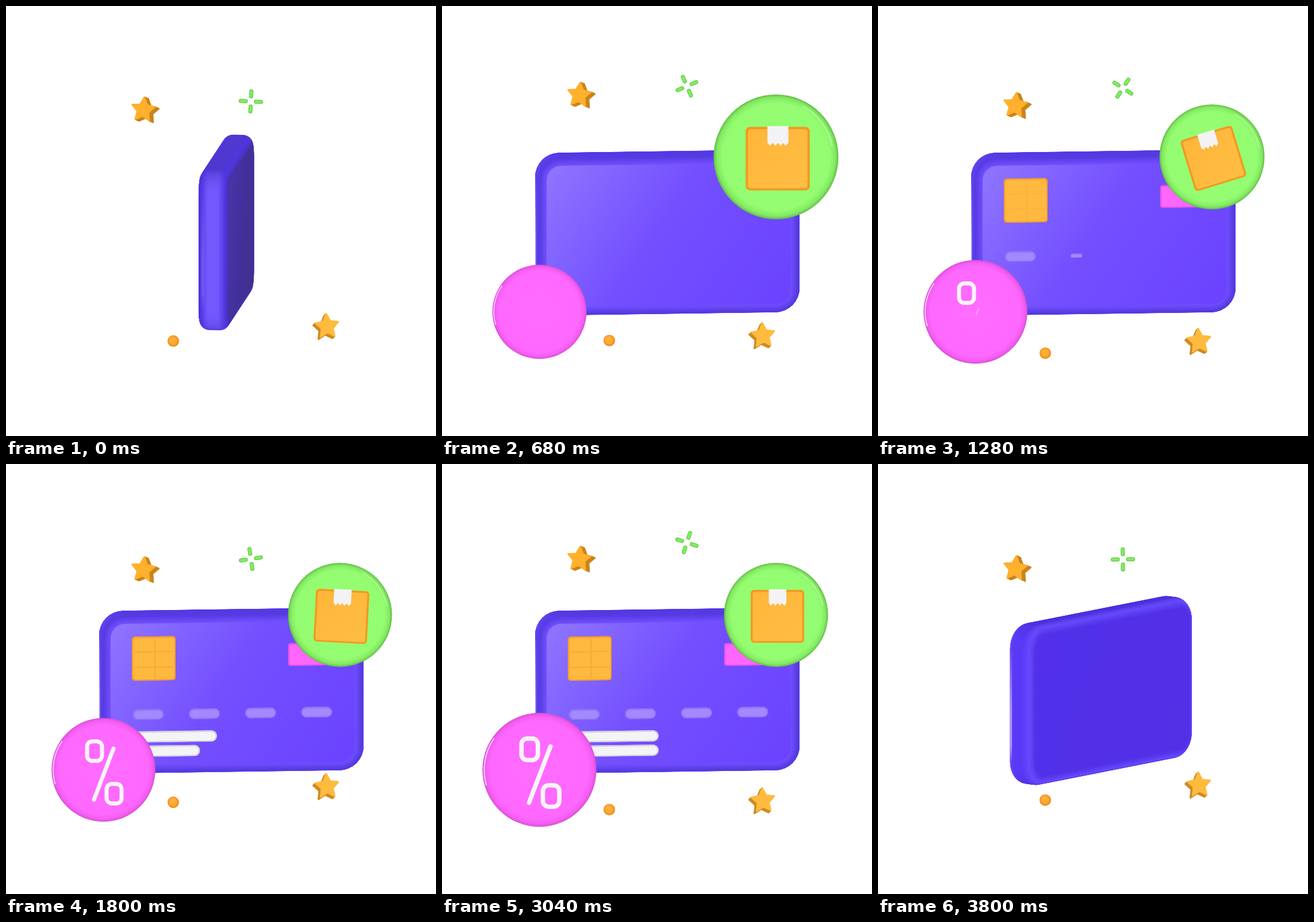
Recreate the animation shown at these times as an HTML page with a canvas. Size 748 by 748 pixels, loop 3.84 s.

```html
<!DOCTYPE html>
<html lang="en">
<head>
<meta charset="utf-8">
<title>Card payment</title>
<style>
  html, body { margin: 0; width: 100%; height: 100%; overflow: hidden; background: #fff; }
  canvas { display: block; width: 748px; height: 748px; }
</style>
</head>
<body>
<canvas id="stage" width="748" height="748"></canvas>
<script>
const ctx = document.getElementById('stage').getContext('2d');
const LOOP = 3840, STEP = 40, TAU = Math.PI * 2;
const CARD = { w: 460, h: 283, depth: 52, bevel: 17, radius: 42, y: 394 };
const TILT_SIN = 0.16, TILT_COS = 0.987;

// Card colours at four yaw angles, blended in between.
const YAWS = [5, 25, 51, 84];
const TONES = {
  light: ['#8d73ff', '#6743ff', '#5230ea', '#4a34a8'],
  face: ['#734fff', '#6440ff', '#5130e8', '#43309c'],
  shade: ['#6b43ff', '#623cff', '#5130e6', '#41308f'],
  edge: ['#563be2', '#6a49fb', '#6749fb', '#4f35e0'],
  wall: ['#5f43f0', '#6446f4', '#5a38f6', '#7459ff'],
  top: ['#5438e4', '#5034dc', '#4c30dc', '#4e38cf']
};

const clamp = v => Math.max(0, Math.min(1, v));
const smooth = u => u * u * (3 - 2 * u);
const progress = (t, start, length) => clamp((t - start) / length);
const rgb = hex => [1, 3, 5].map(i => parseInt(hex.slice(i, i + 2), 16));
const mix = (a, b, u) => a.map((v, i) => v + (b[i] - v) * u);
const css = c => `rgb(${c.map(Math.round).join()})`;

function keyed(t, keys) {
  if (t <= keys[0][0]) return keys[0][1];
  for (let i = 1; i < keys.length; i++) {
    const [t0, v0] = keys[i - 1], [t1, v1] = keys[i];
    if (t < t1) return v0 + (v1 - v0) * smooth((t - t0) / (t1 - t0));
  }
  return keys[keys.length - 1][1];
}

function tone(name, yaw) {
  const i = yaw < YAWS[1] ? 0 : yaw < YAWS[2] ? 1 : 2;
  const u = clamp((yaw - YAWS[i]) / (YAWS[i + 1] - YAWS[i]));
  return mix(rgb(TONES[name][i]), rgb(TONES[name][i + 1]), u);
}

function roundRect(x, y, w, h, r) {
  ctx.beginPath();
  ctx.roundRect(x, y, w, h, Math.min(r, w / 2, h / 2));
}

function at(x, y, scale, angle, draw) {
  ctx.save();
  ctx.translate(x, y);
  ctx.rotate(angle);
  ctx.scale(scale, scale);
  draw();
  ctx.restore();
}

function cardYaw(t) {
  if (t < 600) return 5 + 79 * (1 - t / 600) ** 3;
  return 5 + 46 * Math.max(0, (t - 3140) / 660) ** 1.84;
}

function cardPlane(yaw, z) {
  const a = yaw * Math.PI / 180, s = Math.sin(a), c = Math.cos(a);
  ctx.setTransform(c, -s * TILT_SIN, 0, TILT_COS,
    392 - 9 * s ** 3 + z * s, CARD.y + z * c * TILT_SIN);
}

function cardSlices() {
  const { depth, bevel } = CARD, flat = depth / 2 - bevel, list = [];
  const curve = (i, side) => {
    const phi = i / 24 * Math.PI / 2;
    return { z: side * (flat + bevel * Math.sin(phi)), inset: bevel * (1 - Math.cos(phi)), bend: i / 24, side };
  };
  for (let i = 24; i > 0; i--) list.push(curve(i, -1));
  for (let z = -flat; z <= flat; z++) list.push({ z, inset: 0, bend: 0, side: 0 });
  for (let i = 1; i <= 24; i++) list.push(curve(i, 1));
  return list;
}
const SLICES = cardSlices();

function drawCard(yaw) {
  const { w, h, radius } = CARD;
  const c = {};
  for (const name in TONES) c[name] = tone(name, yaw);
  const shine = keyed(yaw, [[5, 0.75], [25, 0.95], [45, 0]]);

  SLICES.forEach((s, i) => {
    cardPlane(yaw, s.z);
    const toEdge = clamp(s.bend * 2), toFace = s.side > 0 ? clamp(s.bend * 2 - 1) : 0;
    const rim = base => css(mix(mix(base, c.edge, toEdge), c.face, toFace));
    const left = -w / 2 + s.inset, top = -h / 2 + s.inset;
    const paint = ctx.createLinearGradient(-w / 2, 0, w / 2, 0);
    paint.addColorStop(0.01, rim(c.wall));
    paint.addColorStop(0.09, rim(c.top));
    ctx.fillStyle = paint;
    roundRect(left, top, w - 2 * s.inset, h - 2 * s.inset, radius - s.inset);
    ctx.fill();

    const alpha = s.side < 0 && s.bend > 0.2 && s.bend < 0.5 ? Math.max(shine, 0.6) : s.z < 9 && s.bend < 0.5 ? shine : 0;
    if (alpha > 0.01) {
      const glow = ctx.createLinearGradient(0, -h / 2 + radius, 0, h / 2 - radius);
      glow.addColorStop(0, 'rgba(255,255,255,0)');
      glow.addColorStop(0.55, `rgba(255,255,255,${alpha})`);
      glow.addColorStop(0.85, `rgba(255,255,255,${alpha})`);
      glow.addColorStop(1, 'rgba(255,255,255,0)');
      ctx.fillStyle = glow;
      ctx.fillRect(left, -h / 2 + radius, 1.5, h - 2 * radius);
    }
  });

  const last = SLICES[SLICES.length - 1].inset;
  const face = ctx.createLinearGradient(-w / 2, -h / 2, w * 0.4, h * 0.5);
  face.addColorStop(0.08, css(c.light));
  face.addColorStop(0.5, css(c.face));
  face.addColorStop(1, css(c.shade));
  ctx.fillStyle = face;
  roundRect(-w / 2 + last, -h / 2 + last, w - 2 * last, h - 2 * last, radius - last);
  ctx.fill();
}

// A raised plate on the card front; x and y give its centre.
function plate(yaw, x, y, w, h, r, scale, fill, rim) {
  if (scale <= 0.01) return;
  const pw = w * scale, ph = h * scale;
  for (let z = 0; z <= 4; z++) {
    cardPlane(yaw, CARD.depth / 2 + z);
    roundRect(x - pw / 2, y - ph / 2, pw, ph, r * scale);
    ctx.fillStyle = rim;
    ctx.fill();
  }
  const e = 2 * scale;
  roundRect(x - pw / 2 + e, y - ph / 2 + e, pw - 2 * e, ph - 2 * e, r * scale);
  ctx.fillStyle = fill;
  ctx.fill();
}

function drawDetails(t, yaw) {
  const stay = 1 - smooth(progress(t, 3580, 180));
  const grow = (start, length) => smooth(progress(t, start, length)) * stay;

  const chip = grow(900, 220);
  plate(yaw, -138, -63, 76, 77, 5, chip, '#ffb840', '#f3a02b');
  if (chip > 0.9) {
    ctx.strokeStyle = `rgba(226,134,14,${0.12 + 0.28 * progress(t, 1280, 480) + 0.3 * progress(t, 3200, 360)})`;
    ctx.lineWidth = 1.3;
    ctx.beginPath();
    for (const y of [-75, -48]) { ctx.moveTo(-172, y); ctx.lineTo(-104, y); }
    ctx.moveTo(-136, -98); ctx.lineTo(-136, -28);
    ctx.stroke();
  }

  plate(yaw, 135, -66.5, 76, 39, 4, grow(980, 220), '#ff66fb', '#e956ea');

  for (let i = 0; i < 4; i++) {
    const scale = progress(t, 1080 + 140 * i, 160) * stay;
    plate(yaw, -147.5 + 98 * i, 35.6, 54, 18, 9, scale, '#a289ff', '#9075f2');
  }

  [[75, 1560], [100.3, 1640]].forEach(([y, start]) => {
    const u = progress(t, start, 320), len = 158 * (1 - (1 - u) ** 2) * stay;
    if (len > 1) plate(yaw, -176 + len / 2, y, len, 19, 9, 1, '#f4f4f5', '#d4d2dc');
  });
}

function disc(r, inner, face, rim, edge) {
  const paint = ctx.createRadialGradient(1, -1.5, 0, 0, 0, r);
  paint.addColorStop(0, inner);
  paint.addColorStop(0.86, face);
  paint.addColorStop(0.95, rim);
  paint.addColorStop(1, edge);
  ctx.fillStyle = paint;
  ctx.beginPath();
  ctx.arc(0, 0, r, 0, TAU);
  ctx.fill();
}

function glint(r, from, to, color, width) {
  ctx.strokeStyle = color;
  ctx.lineWidth = width;
  ctx.beginPath();
  ctx.arc(0, 0, r, from, to);
  ctx.stroke();
}

function pinkScale(t) {
  if (t > 3060) return 1.1 * (1 - progress(t, 3060, 510) ** 2.2);
  return keyed(t, [[300, 0], [530, 1.2], [695, 0.9], [870, 1.1], [1040, 1], [2820, 1], [3060, 1.1]]);
}

function greenScale(t) {
  if (t > 3380) return 1.1 * (1 - progress(t, 3380, 400) ** 2.5);
  return keyed(t, [[500, 0], [680, 1.2], [900, 0.9], [1110, 1.1], [1320, 1], [3140, 1], [3380, 1.1]]);
}

function drawPercent(t) {
  const grow = start => smooth(progress(t, start, 180));
  ctx.strokeStyle = '#f8f4f8';
  ctx.lineCap = 'round';
  ctx.lineWidth = 7;
  const zero = (x, y, scale) => scale > 0 && at(x, y, scale, 0, () => {
    roundRect(-13, -17, 26, 34, 9);
    ctx.stroke();
  });
  zero(-15.5, -32.5, grow(1060));
  zero(18.5, 41.5, grow(1420));
  const slash = grow(1240);
  if (slash > 0) at(4 - 3.5 * slash, -2 + 9 * slash, slash, 0, () => {
    ctx.beginPath();
    ctx.moveTo(17, -44);
    ctx.lineTo(-17, 45);
    ctx.stroke();
  });
}

function drawPink(t) {
  const scale = pinkScale(t);
  if (scale < 0.01) return;
  at(169.5, 532, scale, 0, () => {
    disc(90.3, '#ff6cff', '#ff68ff', '#f35df0', '#d950d8');
    glint(87.5, 2.85, 3.75, 'rgba(255,255,255,0.8)', 1.6);
    drawPercent(t);
  });
}

function drawParcel() {
  ctx.fillStyle = '#f29a20';
  roundRect(-46.5, -46, 93, 92, 6);
  ctx.fill();
  const paint = ctx.createLinearGradient(-30, -40, 30, 40);
  paint.addColorStop(0, '#ffb63b');
  paint.addColorStop(1, '#ffbd43');
  ctx.fillStyle = paint;
  roundRect(-43, -42.5, 86, 85.5, 4);
  ctx.fill();
  ctx.fillStyle = '#f3f3f6';
  ctx.beginPath();
  ctx.moveTo(-15, -47);
  ctx.lineTo(15.5, -47);
  for (let i = 0; i <= 8; i++) ctx.lineTo(15.5 - i * 3.8, i % 2 ? -18.5 : -23);
  ctx.fill();
}

function drawGreen(t) {
  const scale = greenScale(t);
  if (scale < 0.01) return;
  at(581, 262.5, scale, 0, () => {
    disc(90.5, '#98ff74', '#94fc70', '#83e962', '#62bd48');
    glint(83, 5.2, 6.1, 'rgba(190,255,165,0.6)', 2.5);
    const tilt = keyed(t, [[1080, 0], [1280, -17], [1600, 15], [1880, 0]]);
    at(2.5, 2.5, 1, tilt * Math.PI / 180, drawParcel);
  });
}

const bob = (t, mean, amp, peak) => mean + amp * Math.cos(TAU * (t - peak) / 1920);

function starPath(x, y, angle) {
  ctx.beginPath();
  for (let i = 0; i < 10; i++) {
    const r = i % 2 ? 11 : 22, a = angle - Math.PI / 2 + i * Math.PI / 5;
    ctx.lineTo(x + 0.95 * r * Math.cos(a), y + r * Math.sin(a));
  }
  ctx.closePath();
}

function drawStar(x, y, angle, dx, dy, front, side) {
  ctx.lineJoin = 'round';
  ctx.lineWidth = 2.5;
  for (let i = 8; i >= 0; i--) {
    ctx.fillStyle = ctx.strokeStyle = i ? side : front;
    starPath(x + dx * i / 8, y + dy * i / 8, angle);
    ctx.fill();
    ctx.stroke();
  }
}

function drawBall(y) {
  const paint = ctx.createRadialGradient(289, y - 3, 1, 291, y, 10);
  paint.addColorStop(0, '#ffb546');
  paint.addColorStop(0.6, '#ffa62e');
  paint.addColorStop(1, '#e58a18');
  ctx.fillStyle = paint;
  ctx.beginPath();
  ctx.arc(291, y, 10, 0, TAU);
  ctx.fill();
}

function drawSparkle(t) {
  at(426, bob(t, 150, 16, -20), 1, TAU * t / LOOP + 0.05, () => {
    ctx.lineCap = 'round';
    for (const [color, width] of [['#5fca45', 7], ['#80ee60', 4.5]]) {
      ctx.strokeStyle = color;
      ctx.lineWidth = width;
      ctx.beginPath();
      for (let i = 0; i < 4; i++) {
        const c = Math.cos(i * TAU / 4), s = Math.sin(i * TAU / 4);
        ctx.moveTo(9 * c, 9 * s);
        ctx.lineTo(17.5 * c, 17.5 * s);
      }
      ctx.stroke();
    }
  });
}

function render(t) {
  ctx.setTransform(1, 0, 0, 1, 0, 0);
  ctx.fillStyle = '#fff';
  ctx.fillRect(0, 0, 748, 748);
  const yaw = cardYaw(t);
  drawCard(yaw);
  drawDetails(t, yaw);
  ctx.setTransform(1, 0, 0, 1, 0, 0);
  drawPink(t);
  drawGreen(t);
  drawStar(238.5, bob(t, 169.5, 15, 1690), 0.1, 7, 3, '#ffb02c', '#cb841c');
  drawStar(558.5, bob(t, 570.5, 15, 1105), -0.06, -4, 4, '#ffbb3e', '#d08a22');
  drawBall(bob(t, 589, 15, 1310));
  drawSparkle(t);
}

const began = performance.now();
function tick() {
  const t = (performance.now() - began) % LOOP;
  render(Math.floor(t / STEP) * STEP);
  requestAnimationFrame(tick);
}
tick();
</script>
</body>
</html>
```
